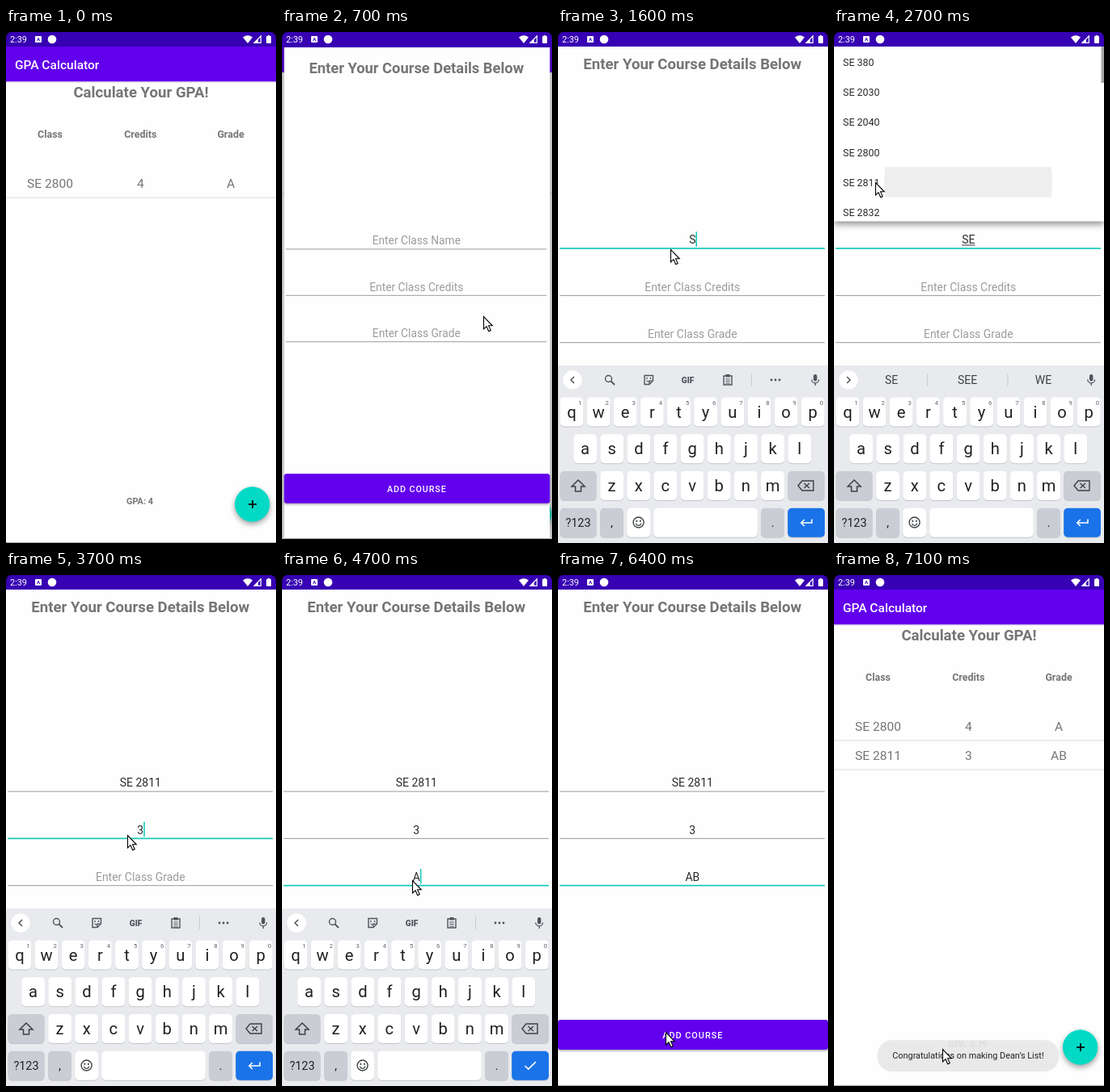
An HTML page with a canvas that plays this animation: 334 px wide and 638 px high, repeating every 7.2 s.

```html
<!DOCTYPE html>
<html lang="en">
<head>
<meta charset="utf-8">
<title>GPA Calculator</title>
<style>
html, body { margin: 0; width: 100%; height: 100%; overflow: hidden; background: #fff; }
canvas { display: block; width: 334px; height: 638px; }
</style>
</head>
<body>
<canvas id="stage" width="334" height="638"></canvas>
<script>
const W = 334, H = 638, LOOP = 7200, STEP = 100, SP = 0.777;
const PURPLE = '#6200ee', DARK = '#3700b3', TEAL = '#03dac5', GRAY = '#757575', ICON = '#50545a';
const ctx = document.getElementById('stage').getContext('2d');

const clamp = v => Math.max(0, Math.min(1, v));
const span = (t, a, b) => clamp((t - a) / (b - a));
const smooth = p => p * p * (3 - 2 * p);
const easeOut = p => 1 - (1 - p) ** 3;
const mix = (a, b, p) => a + (b - a) * p;

// Sizes are in scaled points; cy is the middle of the capitals.
function text(str, x, cy, size, color, weight = 400, align = 'center') {
  const px = size * SP;
  ctx.font = `${weight} ${px}px Roboto, sans-serif`;
  ctx.textAlign = align;
  ctx.fillStyle = color;
  ctx.fillText(str, x, cy + px * 0.355);
  return ctx.measureText(str).width;
}
function rect(x, y, w, h, color) {
  ctx.fillStyle = color;
  ctx.fillRect(x, y, w, h);
}
function round(x, y, w, h, r, color) {
  ctx.beginPath();
  ctx.roundRect(x, y, w, h, r);
  ctx.fillStyle = color;
  ctx.fill();
}
function disc(x, y, r, color) {
  ctx.beginPath();
  ctx.arc(x, y, r, 0, 7);
  ctx.fillStyle = color;
  ctx.fill();
}
function line(points, color = ICON, width = 1.5, close = false) {
  ctx.beginPath();
  points.forEach(([x, y]) => ctx.lineTo(x, y));
  if (close) ctx.closePath();
  ctx.strokeStyle = color;
  ctx.lineWidth = width;
  ctx.stroke();
}
function polygon(points, color) {
  ctx.beginPath();
  points.forEach(([x, y]) => ctx.lineTo(x, y));
  ctx.closePath();
  ctx.fillStyle = color;
  ctx.fill();
}
function ring(x, y, r, color = ICON, width = 1.4, from = 0, to = 7) {
  ctx.beginPath();
  ctx.arc(x, y, r, from, to);
  ctx.strokeStyle = color;
  ctx.lineWidth = width;
  ctx.stroke();
}
function shadowed(blur, dy, color, draw) {
  ctx.save();
  ctx.shadowBlur = blur;
  ctx.shadowOffsetY = dy;
  ctx.shadowColor = color;
  draw();
  ctx.restore();
}
function layer(scale, alpha, draw) {
  ctx.save();
  ctx.globalAlpha = alpha;
  ctx.translate(W / 2, 326);
  ctx.scale(scale, scale);
  ctx.translate(-W / 2, -326);
  draw();
  ctx.restore();
}
const at = (x, y, draw) => {
  ctx.save();
  ctx.translate(x, y);
  draw();
  ctx.restore();
};

function statusBar() {
  rect(0, 0, W, 12, '#000');
  round(0, 5, W, 18, [7, 7, 0, 0], DARK);
  text('2:39', 5, 14, 14, '#fff', 400, 'left');
  round(36, 10, 8, 8, 1, '#fff');
  text('A', 40, 14, 8, DARK, 700);
  disc(57, 14, 5.3, '#fff');
  ctx.beginPath();
  ctx.moveTo(299, 19);
  ctx.lineTo(293, 11.5);
  ctx.quadraticCurveTo(299, 7, 305, 11.5);
  ctx.fillStyle = '#fff';
  ctx.fill();
  line([[307, 18.3], [315.3, 18.3], [315.3, 10]], '#fff', 1.2, true);
  polygon([[306, 19], [312, 19], [312, 13]], '#fff');
  round(322, 10, 6, 9, 0.8, '#fff');
  rect(323.7, 9, 2.6, 1.5, '#fff');
}

function mainScreen(added) {
  rect(0, 0, W, H, '#fefefe');
  rect(0, 0, W, 66.5, PURPLE);
  rect(0, 66.5, W, 1, '#d8d2e2');
  text('GPA Calculator', 11, 45.5, 20, '#fff', 500, 'left');
  text('Calculate Your GPA!', W / 2, 79.8, 24, GRAY, 700);
  const columns = [54.5, 166.3, 278];
  ['Class', 'Credits', 'Grade'].forEach((s, i) => text(s, columns[i], 131.6, 16, GRAY, 700));
  const rows = [['SE 2800', '4', 'A']];
  if (added) rows.push(['SE 2811', '3', 'AB']);
  rows.forEach((row, j) => {
    row.forEach((s, i) => text(s, columns[i], 192.7 + 36 * j, 20, GRAY));
    rect(0, 209.5 + 36 * j, W, 1, '#dcdcdc');
  });
  text(added ? 'GPA: 3.79' : 'GPA: 4', 165.5, 586.5, 14, GRAY, 700);
  rect(0, 637, W, 1, '#aaa');
  shadowed(7, 3, 'rgba(0,0,0,.38)', () => disc(304.7, 590, 21.7, TEAL));
  rect(300, 589.2, 10, 1.7, '#000');
  rect(304.15, 585, 1.7, 10, '#000');
}

function formScreen(t) {
  rect(0, 0, W, H, '#fefefe');
  text('Enter Your Course Details Below', 166.3, 44.5, 24, GRAY, 700);
  const focus = t < 1200 ? -1 : t < 3300 ? 0 : t < 4200 ? 1 : 2;
  const name = t < 1600 ? '' : t < 1800 ? 'S' : t < 2800 ? 'SE' : 'SE 2811';
  const values = [name, t < 3700 ? '' : '3', t < 4700 ? '' : t < 4900 ? 'A' : 'AB'];
  const edits = [1200, 1600, 1800, 2800, 3300, 3700, 4200, 4700, 4900];
  const lastEdit = edits.filter(e => e <= t).pop() || 0;
  const caretOn = Math.floor((t - lastEdit) / 500) % 2 === 0;
  ['Name', 'Credits', 'Grade'].forEach((label, i) => {
    const cy = 262.4 + 58.3 * i, value = values[i];
    const w = value ? text(value, 166.3, cy, 18, '#2b2b2b')
                    : text('Enter Class ' + label, 166.3, cy, 18, '#9c9c9c');
    if (value === 'SE') rect(166.3 - w / 2, 268.5, w, 1, '#333');
    if (i === focus) {
      rect(2, cy + 9.8, 328, 1.7, '#16c9b7');
      if (caretOn) rect(166.3 + (value ? w / 2 : 0), cy - 10, 1.6, 18.5, '#16c9b7');
    } else rect(2, cy + 10.2, 328, 1, '#9a9a9a');
  });
  shadowed(3, 1.5, 'rgba(0,0,0,.35)', () => round(0, 556, W, 37, 3, PURPLE));
  ctx.letterSpacing = '0.97px';
  text('ADD COURSE', 166.8, 575, 14, '#fff', 500);
  ctx.letterSpacing = '0px';
  rect(0, 637, W, 1, '#aaa');
}

function dropdown(t) {
  const shown = t < 2800 ? span(t, 1800, 2000) : 1 - span(t, 2800, 3000);
  if (!shown) return;
  ctx.save();
  ctx.globalAlpha = shown;
  shadowed(8, 3, 'rgba(0,0,0,.45)', () => rect(0, 23, W, 216.5, '#fff'));
  if (t >= 2600) {
    ctx.save();
    ctx.beginPath();
    ctx.rect(0, 172.3, W, 37.2);
    ctx.clip();
    disc(166, 191, mix(20, 104, (t - 2600) / 100), '#eee');
    ctx.restore();
  }
  ['380', '2030', '2040', '2800', '2811', '2832'].forEach((code, i) =>
    text('SE ' + code, 11, 42.6 + 37.2 * i, 16, '#2b2b2b', 400, 'left'));
  rect(330.5, 23, 3.5, 45, '#a5a5a5');
  ctx.restore();
}

function key(x, y, w, label, color = '#fff', size = 26) {
  round(x, y + 1, w, 36, 5, '#c3c6ca');
  round(x, y, w, 36, 5, color);
  if (label) text(label, x + w / 2, y + 18, size, '#202124');
}

function toolbar(suggesting) {
  disc(18, 436, 11.7, '#fff');
  const d = suggesting ? 1 : -1;
  line([[18 - 2 * d, 432], [18 + 2 * d, 436], [18 - 2 * d, 440]]);
  if (suggesting) {
    ['SE', 'SEE', 'WE'].forEach((s, i) => text(s, 71 + 94 * i, 436.5, 18, '#3c4043'));
    rect(115, 428, 1, 16, '#c8cace');
    rect(214.5, 428, 1, 16, '#c8cace');
  } else {
    ring(62.5, 434.5, 4);
    line([[65.5, 437.5], [70, 442]], ICON, 1.8);
    line([[107, 430.5], [117.5, 430.5], [117.5, 437], [113, 441.5], [107, 441.5]], ICON, 1.4, true);
    line([[117, 437], [113, 437], [113, 441]], ICON, 1.2);
    disc(110, 434, 0.9, ICON);
    disc(114.5, 434, 0.9, ICON);
    ring(112, 435.5, 2.6, ICON, 1.1, 0.4, 2.7);
    text('GIF', 160.5, 436, 13, ICON, 900);
    line([[205, 431], [215, 431], [215, 442], [205, 442]], ICON, 1.4, true);
    rect(207.5, 429, 5, 3.5, ICON);
    [434.5, 437, 439.5].forEach(y => rect(207.3, y, 5.4, 1, ICON));
    rect(239, 428, 1, 16, '#c8cace');
    [264, 269, 274].forEach(x => disc(x, 436, 1.4, ICON));
  }
  round(316, 429, 4.4, 8.5, 2.2, ICON);
  ring(318.2, 435.5, 4.4, ICON, 1.3, 0, Math.PI);
  rect(317.6, 440, 1.3, 3, ICON);
}

function keyboard(t) {
  const rise = t < 5000 ? easeOut(span(t, 1200, 1500)) : 1 - smooth(span(t, 5600, 6000));
  if (!rise) return;
  at(0, 220 * (1 - rise), () => {
    const pitch = 33.15, dim = '#cacdd4';
    rect(0, 418, W, 220, '#e8eaee');
    toolbar(t >= 1800 && t < 2800);
    [...'qwertyuiop'].forEach((c, i) => {
      const x = 2.5 + pitch * i;
      key(x, 457.5, 28.8, c);
      text(String((i + 1) % 10), x + 25, 464, 10, '#5f6368');
    });
    [...'asdfghjkl'].forEach((c, i) => key(19.2 + pitch * i, 503.2, 28.8, c));
    [...'zxcvbnm'].forEach((c, i) => key(52.2 + pitch * i, 549, 28.8, c));
    key(2.5, 549, 45, '', dim);
    key(284.2, 549, 45.8, '', dim);
    key(2.5, 594.7, 45, '?123', dim, 18.5);
    key(52.2, 594.7, 28.8, ',', dim, 20);
    key(85.2, 594.7, 28.8);
    key(118.2, 594.7, 128.6);
    key(251.2, 594.7, 28.8, '.', dim, 20);
    key(284.2, 594.7, 45.8, '', '#1a73e8');
    line([[25, 560], [33, 568], [28.5, 568], [28.5, 574], [21.5, 574], [21.5, 568], [17, 568]], '#3c4043', 1.5, true);
    line([[297, 567], [302, 561], [316, 561], [316, 573], [302, 573]], '#3c4043', 1.4, true);
    line([[304.5, 564], [311, 570]], '#3c4043', 1.3);
    line([[311, 564], [304.5, 570]], '#3c4043', 1.3);
    ring(99.6, 612.5, 6.5, '#3c4043');
    disc(97.3, 610.8, 1.1, '#3c4043');
    disc(101.9, 610.8, 1.1, '#3c4043');
    ring(99.6, 613, 3.3, '#3c4043', 1.3, 0.2, 2.94);
    if (t >= 4200) line([[300.5, 613], [304.8, 617], [314, 608]], '#fff', 1.7);
    else {
      line([[314, 608.5], [314, 613], [301, 613]], '#fff', 1.6);
      line([[304.8, 609], [300.8, 613], [304.8, 617]], '#fff', 1.6);
    }
  });
}

function toast(t) {
  const shown = span(t, 6800, 7100);
  if (!shown) return;
  ctx.save();
  ctx.globalAlpha = shown * 0.9;
  shadowed(2, 1, 'rgba(0,0,0,.15)', () => round(54, 581, 224, 37.5, 18, '#ececec'));
  ctx.globalAlpha = shown;
  text('Congratulations on making Dean\u2019s List!', 166, 600.3, 14, '#222');
  ctx.restore();
}

const path = [
  [200, 322, 612], [300, 306, 594], [500, 300, 585], [700, 249, 357], [1100, 139, 274],
  [1900, 139, 274], [2500, 51, 191], [2800, 51, 191], [3200, 150, 327], [3700, 150, 327],
  [4200, 161, 383], [4900, 161, 383], [5500, 307, 612], [5700, 307, 612], [6200, 133, 571],
  [6500, 133, 571], [7000, 134, 592]
];
function pointer(t) {
  if (t < path[0][0]) return;
  const i = path.findLastIndex(p => p[0] <= t);
  const a = path[i], b = path[i + 1] || a;
  const p = a === b ? 0 : smooth(span(t, a[0], b[0]));
  at(mix(a[1], b[1], p), mix(a[2], b[2], p), () => {
    const arrow = [[0.5, 0.5], [0.5, 16], [4, 12.7], [6.7, 18.7], [9.2, 17.6], [6.6, 11.8], [11.3, 11.8]];
    polygon(arrow, '#fff');
    line(arrow, '#000', 1.1, true);
  });
}

function draw(t) {
  ctx.globalAlpha = 1;
  if (t < 400) mainScreen(false);
  else if (t < 800) {
    const p = easeOut(span(t, 400, 970));
    layer(mix(1, 1.05, p), 1, () => mainScreen(false));
    rect(0, 0, W, H, `rgba(0,0,0,${0.25 * p})`);
    rect(0, 633, W, 5, '#000');
    layer(mix(0.85, 1, p), span(t, 400, 600), () => formScreen(t));
    rect(0, 5, W, 19, DARK);
  } else if (t < 6500) {
    formScreen(t);
    keyboard(t);
    dropdown(t);
  } else {
    const p = easeOut(span(t, 6500, 6900));
    layer(mix(1.1, 1, p), 1, () => mainScreen(true));
    if (p < 1) layer(mix(1, 0.9, p), 1 - span(t, 6500, 6700), () => formScreen(t));
  }
  statusBar();
  toast(t);
  pointer(t);
}

const start = performance.now();
function tick() {
  const t = (performance.now() - start) % LOOP;
  draw(Math.floor(t / STEP) * STEP);
  requestAnimationFrame(tick);
}
tick();
</script>
</body>
</html>
```
